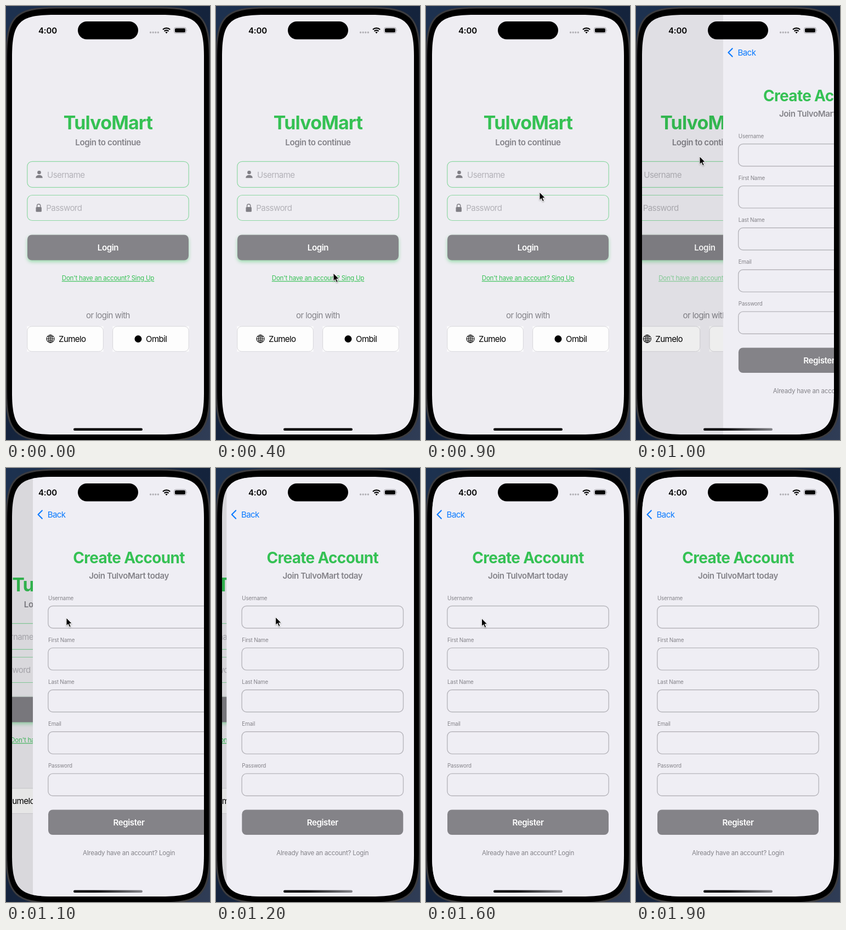
An HTML page for the animation above (2 s loop, 372 by 788 pixels).

```html
<!DOCTYPE html>
<html lang="en">
<head>
<meta charset="utf-8">
<title>Sign-up flow</title>
<style>
  html, body { margin: 0; width: 100%; height: 100%; overflow: hidden; background: #000; }
  svg { display: block; width: 372px; height: 788px; }
  text { font: 400 15.1px Inter, "Liberation Sans", sans-serif; letter-spacing: -.04em; fill: #848389; }
  .mid { text-anchor: middle; }
  .semi { font-weight: 600; letter-spacing: -.027em; }
  .title { font-weight: 700; font-size: 28px; fill: #35c154; letter-spacing: -.025em; }
  .brand { font-size: 34px; }
  .clock { font-size: 15px; letter-spacing: -.01em; }
  .small { font-size: 11.6px; letter-spacing: -.02em; }
  .label { font-size: 9.8px; letter-spacing: -.02em; }
  .hint { fill: #b3b2b8; }
  .white { fill: #fff; }
  .dark { fill: #000; }
  .link { fill: #35c154; text-decoration: underline; }
  .back { fill: #0a7aff; }
  .field { fill: none; stroke: #8ed8a4; stroke-width: 1.2; }
  .plain .field { stroke: #b7b6bc; stroke-width: 1.4; }
  .button { fill: #848388; }
  .glow { filter: drop-shadow(0 3px 3px rgba(52, 199, 89, .45)); }
  .icon { fill: #807f85; }
  .line { fill: none; stroke: #000; stroke-width: 1; }
  .wifi { stroke-width: 2.2; }
  #cursor { stroke: #fff; filter: drop-shadow(0 1px 1px rgba(0, 0, 0, .3)); }
</style>
</head>
<body>
<svg viewBox="0 0 372 788">
  <defs>
    <clipPath id="screen"><path id="glass"/></clipPath>
    <linearGradient id="desktop" x2="1" y2="1">
      <stop stop-color="#1d3250"/><stop offset=".5" stop-color="#14233c"/><stop offset="1" stop-color="#303d56"/>
    </linearGradient>
    <linearGradient id="fade">
      <stop offset=".3" stop-color="#08080a"/><stop offset="1" stop-color="#85858a"/>
    </linearGradient>
  </defs>

  <rect width="372" height="788" fill="url(#desktop)"/>
  <path id="body" stroke="#3c3c3f" stroke-width="3"/>

  <g clip-path="url(#screen)">
    <g id="login">
      <rect x="11" y="16" width="350" height="762" fill="#eeedf2"/>
      <text class="title brand mid" x="186" y="223.5">TulvoMart</text>
      <text class="semi mid" x="186" y="252.5">Login to continue</text>

      <rect class="field" x="38.8" y="282.3" width="294.4" height="47" rx="9"/>
      <g class="icon">
        <circle cx="60.5" cy="302.2" r="3.3"/>
        <path d="M54.3 312.2c0-3.6 2.6-5.2 6.2-5.2s6.2 1.6 6.2 5.2z"/>
        <rect x="54.5" y="365" width="10.4" height="8.8" rx="1.6"/>
        <path d="M56.6 366v-3.2a3.1 3.1 0 0 1 6.2 0v3.2" fill="none" stroke="#807f85" stroke-width="1.4"/>
      </g>
      <text class="hint" x="75" y="311.5">Username</text>
      <rect class="field" x="38.8" y="343.5" width="294.4" height="46" rx="9"/>
      <text class="hint" x="73.3" y="372">Password</text>

      <rect class="button glow" x="39" y="415.5" width="294" height="46" rx="8"/>
      <text class="semi white mid" x="186" y="444">Login</text>
      <text class="small link mid" id="link" x="186" y="498.3">Don't have an account? Sing Up</text>

      <text class="mid" x="186" y="567.3">or login with</text>
      <g fill="#fdfdfd">
        <path d="M38.5 581.5h139v46h-139zM194.5 581.5h139v46h-139z"/>
        <g stroke="#d6d5da">
          <rect x="38.8" y="581.7" width="138.6" height="45.6" rx="8"/>
          <rect x="194.6" y="581.7" width="138.6" height="45.6" rx="8"/>
        </g>
      </g>
      <g class="line">
        <circle cx="81" cy="604.3" r="7.1"/>
        <ellipse cx="81" cy="604.3" rx="3.4" ry="7.1"/>
        <path d="M81 597.2v14.2M73.9 604.3h14.2M75.4 600.3q5.6 1.6 11.2 0M75.4 608.3q5.6-1.6 11.2 0"/>
      </g>
      <text class="dark" x="96" y="609.8">Zumelo</text>
      <circle cx="241" cy="604.5" r="6.5"/>
      <text class="dark" x="255" y="609.8">Ombil</text>
    </g>
    <rect id="dim" x="11" y="16" width="350" height="762" opacity="0"/>

    <g id="signup" class="plain" transform="translate(350)">
      <rect x="11" y="16" width="350" height="762" fill="#efeef4"/>
      <path d="M27.8 77.2l-7.3 7.3 7.3 7.3" fill="none" stroke="#0a7aff" stroke-width="2.1" stroke-linecap="round" stroke-linejoin="round"/>
      <text class="back" x="37.6" y="90">Back</text>
      <text class="title mid" x="186" y="172.8">Create Account</text>
      <text class="semi mid" x="186" y="200.6">Join TulvoMart today</text>
      <g id="form"></g>
      <rect class="button" x="39" y="620.5" width="294" height="45.5" rx="8"/>
      <text class="semi white mid" x="186" y="649">Register</text>
      <text class="small mid" x="186" y="703">Already have an account? Login</text>
    </g>

    <text class="semi dark clock" x="59" y="49.7">4:00</text>
    <rect x="131" y="28" width="110" height="32.5" rx="16.2"/>
    <g fill="#b0afb4">
      <circle cx="263.6" cy="48" r="1.7"/><circle cx="268.2" cy="48" r="1.7"/>
      <circle cx="272.8" cy="48" r="1.7"/><circle cx="277.4" cy="48" r="1.7"/>
    </g>
    <path class="line wifi" d="M286 42.8a9.4 9.4 0 0 1 13.2 0M288.6 45.7a5.7 5.7 0 0 1 8 0"/>
    <path d="M292.6 49.9l-2.1-2.2a3 3 0 0 1 4.2 0z"/>
    <rect x="306.5" y="39" width="22" height="10.6" rx="3.3" fill="none" stroke="#9f9ea4"/>
    <rect x="308" y="40.5" width="19" height="7.6" rx="2"/>
    <path d="M329.7 42.5q1.6 1.8 0 3.6z" fill="#9f9ea4"/>
    <rect id="home" x="123" y="766.5" width="126" height="4.5" rx="2.2"/>
  </g>

  <path id="cursor" d="M0 0V14.5L3.3 11.5 5.8 17 8.3 16 5.9 10.6H10.4Z"/>
</svg>

<script>
  const $ = id => document.getElementById(id);
  const LOOP = 2000, STEP = 100, WIDTH = 350, PUSH = 1000;

  // Rectangle with continuous corners, which blend into the sides earlier than arcs.
  function squircle(x, y, w, h, r) {
    const e = r * 1.53, c = r * .27, f = e - c;
    return `M${x + e} ${y}h${w - 2 * e}c${f} 0 ${e} ${c} ${e} ${e}
      v${h - 2 * e}c0 ${f} ${-c} ${e} ${-e} ${e}
      h${2 * e - w}c${-f} 0 ${-e} ${-c} ${-e} ${-e}
      v${2 * e - h}c0 ${-f} ${c} ${-e} ${e} ${-e}z`;
  }
  $('glass').setAttribute('d', squircle(11, 16, 350, 762, 50));
  $('body').setAttribute('d', squircle(.5, 3, 371, 787, 60));

  $('form').innerHTML = ['Username', 'First Name', 'Last Name', 'Email', 'Password'].map((name, i) => {
    const y = 250.5 + i * 76.1;
    return `<text class="label" x="39" y="${y - 11}">${name}</text>
      <rect class="field" x="38.8" y="${y}" width="294.4" height="40.3" rx="8.5"/>`;
  }).join('');

  // time, x, y of the pointer tip
  const pointer = [
    [200, 262, 640], [300, 226, 530], [400, 214, 485], [800, 214, 485], [900, 207, 338],
    [1000, 116, 273], [1100, 110, 272], [1400, 106, 268], [1800, 97, 278]
  ];

  function pointerAt(t) {
    const i = pointer.findIndex(p => p[0] >= t);
    if (i < 0 || t < pointer[0][0]) return null;
    const b = pointer[i], a = pointer[Math.max(i - 1, 0)];
    const k = b === a ? 0 : (t - a[0]) / (b[0] - a[0]);
    return [a[1] + (b[1] - a[1]) * k, a[2] + (b[2] - a[2]) * k];
  }

  // Share of the push still to travel: critically damped spring, already under way when first seen.
  function remaining(t) {
    if (t < PUSH) return 1;
    const u = 1.94 + (t - PUSH) * .01845;
    return (1 + u) * Math.exp(-u);
  }

  function draw(t) {
    const left = remaining(t), pushed = t >= PUSH;
    $('signup').setAttribute('transform', `translate(${WIDTH * left})`);
    $('login').setAttribute('transform', `translate(${-.3 * WIDTH * (1 - left)})`);
    $('dim').setAttribute('opacity', .1 * (1 - left));
    $('link').setAttribute('opacity', pushed ? Math.min(1, .55 + (t - PUSH) * .0035) : 1);
    $('home').setAttribute('fill', pushed ? 'url(#fade)' : '#000');
    const tip = pointerAt(t);
    $('cursor').setAttribute('visibility', tip ? 'visible' : 'hidden');
    if (tip) $('cursor').setAttribute('transform', `translate(${tip})`);
  }

  const start = performance.now();
  function tick() {
    const t = (performance.now() - start) % LOOP;
    draw(Math.floor(t / STEP) * STEP);
    requestAnimationFrame(tick);
  }
  tick();
</script>
</body>
</html>
```
